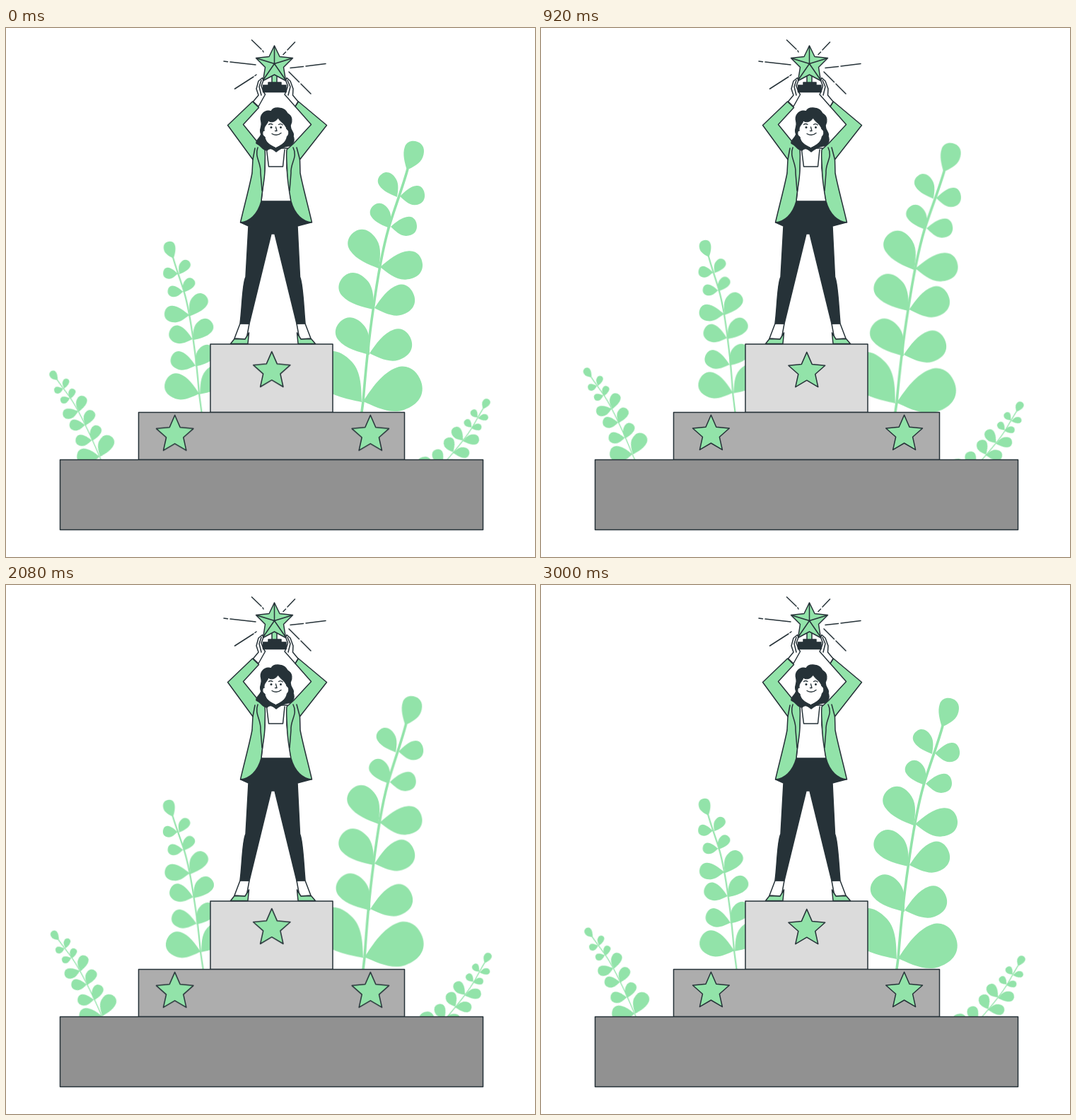
Recreate the animation shown at these times as an HTML page. Size 748x748 px, loop 3040 ms.

```html
<!DOCTYPE html>
<html lang="en">
<head>
<meta charset="utf-8">
<title>Winner on the podium</title>
<style>
  html, body { margin: 0; width: 100%; height: 100%; overflow: hidden; background: #fff; }
  svg { display: block; width: 100vw; height: 100vh; }
  .line { stroke: #263238; stroke-width: 1.5; stroke-linejoin: round; stroke-linecap: round; }
  .green { fill: #92e3a9; }
  .dark { fill: #263238; }
  .white { fill: #fff; }
  .none { fill: none; }

  #plants { transform-origin: 374px 374px; animation: wind 3040ms linear infinite; }
  #stars { transform-origin: 376.9px 528px; animation: beat 3040ms linear infinite; }

  /* A three second sway, then one short hold before the loop restarts */
  @keyframes wind {
    0%, 98.68%, 100% { transform: rotate(0deg); }
    24.67% { transform: rotate(1deg); }
    74.01% { transform: rotate(-1deg); }
  }
  @keyframes beat {
    0% { transform: scale(1.0122); }
    12.34% { transform: scale(1.028); }
    24.67%, 49.34% { transform: scale(1); }
    61.68% { transform: scale(1.028); }
    74.01%, 100% { transform: scale(1); }
  }
</style>
</head>
<body>
<svg viewBox="0 0 748 748">
  <defs>
    <g id="plant" class="green">
      <path d="M568 199C562 222 547 262 541 283C531 318 523 370 519 399C513 440 508 490 505 528L497 588"
            fill="none" stroke="#92e3a9" stroke-width="3.6"/>
    </g>
  </defs>

  <g id="plants">
    <use href="#plant"/>
    <use href="#plant" transform="translate(231 313) scale(-.585 .585) translate(-577 -179)"/>
    <use href="#plant" transform="translate(67 491.5) rotate(-18) scale(-.37 .37) translate(-577 -179)"/>
    <use href="#plant" transform="translate(678 530.5) rotate(48) scale(-.37 .37) translate(-577 -179)"/>
  </g>

  <g class="line">
    <rect x="289" y="447" width="173" height="96.5" fill="#dbdbdb"/>
    <rect x="187.5" y="543.5" width="376" height="67" fill="#adadad"/>
    <rect x="76.5" y="610.5" width="598" height="99" fill="#919191"/>
  </g>

  <g id="stars" class="line green"></g>

  <g id="rays" class="line none">
    <path d="M347.5 17L361 30M363 32L364 34M408.5 20L398 31M395.5 34L392 37.5"/>
    <path d="M308 47L313.5 47.7M317 48L353 52M452 50.5L424 54M420.5 54.5L402 56.5"/>
    <path d="M323.5 86L350 69M352 67.5L354 66M431 93L417 79M414.5 76.5L400 62"/>
  </g>

  <g id="winner" class="line">
    <!-- legs -->
    <path class="white" d="M331 418L323 439L340 440L344 418Z"/>
    <path class="white" d="M411 418L415 440L431 439L423 418Z"/>
    <path class="green" d="M317.5 446.5L323 439.5L338 440L343.5 431L342 446.5Z"/>
    <path class="green" d="M437.5 446.5L431.5 439.5L417 440L411.5 431L413 446.5Z"/>
    <path class="dark" d="M361 245H403C407 261 416 269 431 275L412 280L415.5 352C420 362 421 396 423 417.5L411 418L380 291H375L344 418L331 417.5C334 396 334 362 339 352L343 280L332 275C348 269 357 261 361 245Z"/>

    <!-- torso -->
    <path class="white" d="M365 170H398L397 198L403 245H361L366 198Z"/>
    <path class="none" d="M368.5 172L371.5 196H391.5L394 172"/>

    <!-- forearms and hands -->
    <path class="white" d="M349.5 104L357 95L354 86L357 75L362.5 70.5L364 74L361 82L364 90L366.5 94L357 111Z"/>
    <path class="white" d="M413 104L405.5 95L406 86L402 75L397 70.5L395.5 74L398.5 82L396 90L394 94L409 111Z"/>
    <path class="none" d="M361 74L358 83L361 95M398 74L402 83L399 95"/>

    <!-- jacket -->
    <path class="green" d="M348.5 104L313.5 137.5L349 186L348 205C345 222 336 255 331.5 275C344 274 356 264 361 245C362 228 366 215 366 200C366 188 367 180 366 172L357 163L335.5 136.5L357.5 112.5Z"/>
    <path class="green" d="M413.5 104L453.5 137.5L415.5 186L416 205C419 222 428 255 432.5 275C420 274 408 264 403 245C400 228 397.5 215 397.5 200C397 188 396 180 397 172L407 163L431.5 136.5L409 111Z"/>
    <path class="none" d="M349 186L352 170M356 169C351 183 361 190 360 205L362 230M415.5 186L411 169M406 169C413 183 402 190 403 205L401 230"/>

    <!-- head -->
    <path class="dark" d="M361 150C357 144 363 139 361 133C358 123 366 115 375 118C378 111 394 111 398 121C405 125 405 132 402 138C402 146 408 147 406 153C409 160 405 167 398 167C393 168 388 170 382 175C376 170 373 169 369 173C361 172 363 167 354 163C353 158 359 157 361 150Z"/>
    <path class="white" d="M365 145C364 139 370 136 371 131C375 135 382 132 385 127C387 133 395 135 397 143C401 145 400 152 397.500 153C396 162 389 166 381.500 169.500C374 166 367 162 366 154C362 152 362 146 365 145Z" stroke-width="1"/>
    <path class="none" stroke-width="1.3" d="M371.500 136.500Q374 134.500 377 136.500M385.500 136.500Q388.500 134.500 391 137M381.500 140L383 145.500H380.500M376 149.500Q383 153.500 389 148.500"/>
    <g class="dark" stroke="none">
      <circle cx="375" cy="140.500" r="1.500"/>
      <circle cx="388.500" cy="140.500" r="1.500"/>
    </g>

    <!-- trophy -->
    <path class="green" d="M376 64H383V78H376Z"/>
    <path class="dark" d="M371 77H389V81H396V90.500H363.500V81H371Z"/>
    <path class="green" d="M379.500 25L387 40.500L405.500 42.500L392.500 55.500L395.500 74.500L379.500 66L363.500 74.500L366.500 55.500L353.500 42.500L372 40.500Z"/>
    <path class="none" d="M379.500 50.500V26M379.500 50.500L404 43M379.500 50.500L395 73M379.500 50.500L364 73M379.500 50.500L355 43"/>
  </g>
</svg>
<script>
  const add = (parent, attrs) => {
    const el = document.createElementNS("http://www.w3.org/2000/svg", "path");
    for (const k in attrs) el.setAttribute(k, attrs[k]);
    parent.append(el);
  };
  const byId = id => document.getElementById(id);

  // Leaf from its stem point to its far end, slightly lopsided
  function leaf(x, y, endX, endY, width) {
    const len = Math.hypot(endX - x, endY - y), h = width / 2;
    const turn = Math.atan2(endY - y, endX - x) * 180 / Math.PI;
    const pt = (a, b) => `${(a * len).toFixed(1)} ${(b * h).toFixed(1)} `;
    add(byId("plant"), {
      transform: `translate(${x} ${y}) rotate(${turn})`,
      d: "M0 0C" + pt(.2, -.45) + pt(.45, -1) + pt(.7, -1) +
         "C" + pt(.9, -1) + pt(1, -.5) + pt(1, 0) +
         "C" + pt(1, .6) + pt(.85, 1) + pt(.58, 1) +
         "C" + pt(.35, 1) + pt(.15, .4) + "0 0Z"
    });
  }

  [
    [567, 201, 582, 161, 29],
    [553, 239, 532, 206, 25], [557, 238, 592, 236, 27],
    [543, 283, 521, 250, 26], [544, 281, 581, 280, 27],
    [527, 340, 493, 288, 40], [529, 338, 589, 334, 40],
    [520, 398, 478, 351, 41], [521, 396, 577, 378, 42],
    [514, 462, 474, 414, 41], [514, 460, 573, 441, 43],
    [503, 529, 443, 464, 57], [505, 528, 587, 500, 60]
  ].forEach(l => leaf(...l));

  function star(cx, cy) {
    const pts = Array.from({ length: 10 }, (_, i) => {
      const r = i % 2 ? 12.6 : 27.2, a = i * Math.PI / 5;
      return `${(cx + r * Math.sin(a)).toFixed(2)} ${(cy - r * Math.cos(a)).toFixed(2)}`;
    });
    add(byId("stars"), { d: `M${pts.join("L")}Z` });
  }
  star(375.8, 485.6);
  star(240.4, 574.4);
  star(513.6, 574.4);
</script>
</body>
</html>
```
